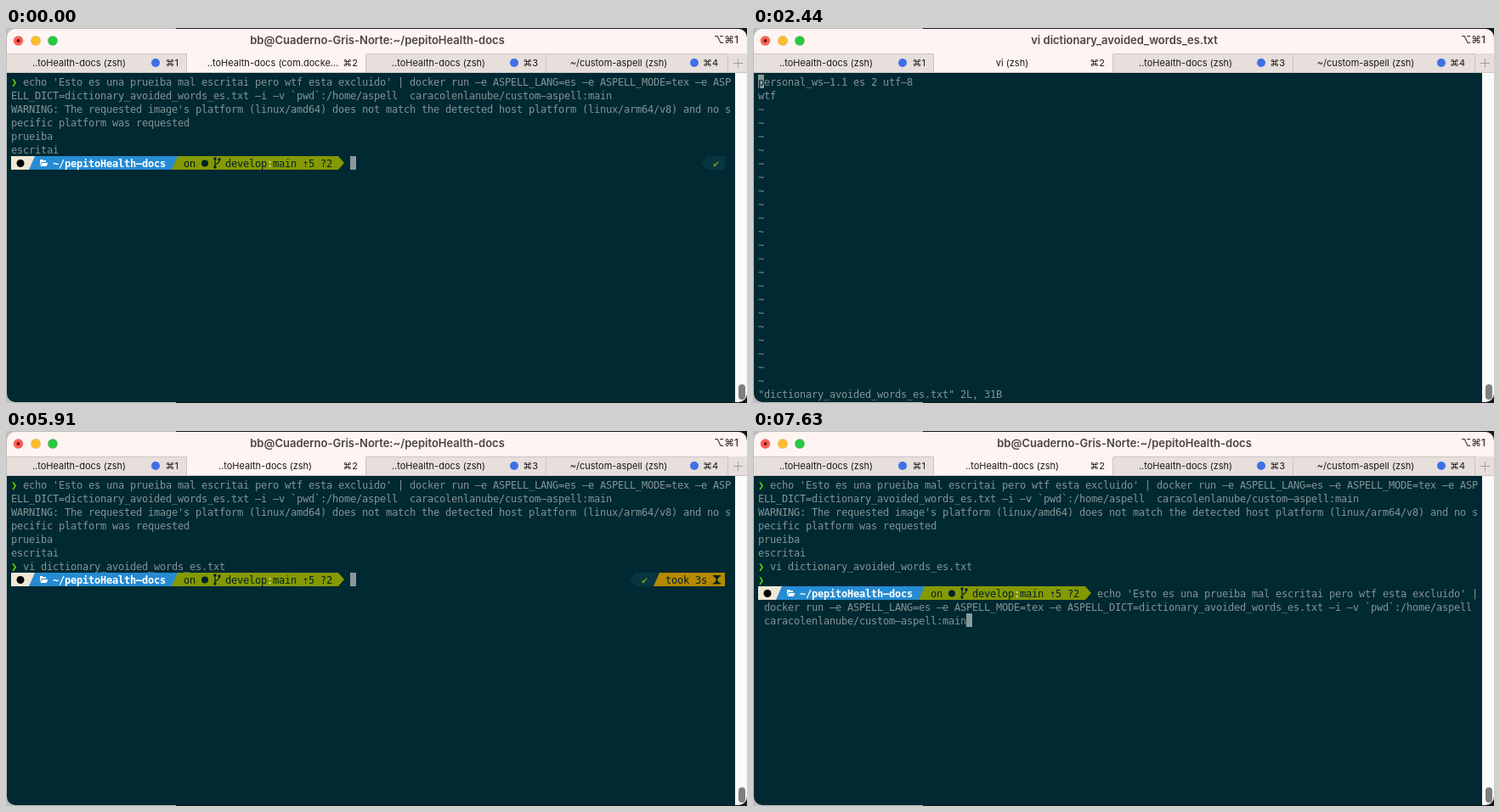
Write an HTML page with a canvas that moves like this. It is 872 px wide and 442 px high and loops after 8000 ms.

```html
<!DOCTYPE html>
<html lang="es">
<head>
<meta charset="utf-8">
<style>
  html, body { margin: 0; width: 100%; height: 100%; overflow: hidden; }
  canvas { display: block; }
</style>
</head>
<body>
<canvas id="stage" width="872" height="442"></canvas>
<script>
const ctx = document.getElementById('stage').getContext('2d');
const LOOP = 8000, COLS = 121, CELL_W = 7, CELL_H = 16, LEFT = 6, TOP = 55;
const MONO = '12px "DejaVu Sans Mono", monospace';
const UI = 'Inter, sans-serif';
const C = {
  bg: '#002932', text: '#839496', cursor: '#8a9a9b', arrow: '#5fd700',
  cream: '#eee8d5', blue: '#268bd2', green: '#859900', amber: '#b58900',
  dim: '#073642', ink: '#00212a', bar: '#fef5f2', tab: '#e6dfdc', line: '#cdc5c2'
};

const FILE = 'dictionary_avoided_words_es.txt';
const VI = 'vi ' + FILE;
const ECHO = "echo 'Esto es una prueiba mal escritai pero wtf esta excluido' | " +
  'docker run -e ASPELL_LANG=es -e ASPELL_MODE=tex -e ASPELL_DICT=' + FILE +
  ' -i -v `pwd`:/home/aspell  caracolenlanube/custom-aspell:main';
const WARNING = "WARNING: The requested image's platform (linux/amd64) does not match " +
  'the detected host platform (linux/arm64/v8) and no specific platform was requested';
const SHELL_TITLE = 'bb@Cuaderno-Gris-Norte:~/pepitoHealth-docs';
const DIR = '..toHealth-docs';

// Each list holds [start time, value]; the latest started value applies.
const TYPED = [[0, ''], [1030, 'v'], [1130, 'vi'], [1410, 'vi '], [1520, 'vi d'],
  [1620, 'vi di'], [1720, 'vi dic'], [2030, VI]];
const RECALLED = [[0, ''], [7560, VI], [7630, ECHO]];
const STATUS = [[0, `"${FILE}" 2L, 31B`], [3660, '-- INSERT --'], [3940, ''],
  [5380, ':'], [5500, ':wq']];
const TAB_TITLE = [[0, DIR + ' (com.docke...'], [30, DIR + ' (zsh)'], [2440, 'vi (zsh)'],
  [3030, 'vi (vi)'], [5720, DIR + ' (vi)'], [5850, DIR + ' (zsh)']];
const at = (list, t) => list.filter(([start]) => start <= t).pop()[1];

const cellX = col => LEFT + col * CELL_W;
const cellY = row => TOP + row * CELL_H;

function rect(x, y, w, h, color) {
  ctx.fillStyle = color;
  ctx.fillRect(x, y, w, h);
}

function poly(color, ...points) {
  ctx.fillStyle = color;
  ctx.beginPath();
  points.forEach(([x, y]) => ctx.lineTo(x, y));
  ctx.fill();
}

function disc(x, y, r, color) {
  ctx.fillStyle = color;
  ctx.beginPath();
  ctx.arc(x, y, r, 0, 7);
  ctx.fill();
}

function label(text, x, y, font, color, align = 'center') {
  ctx.font = `${font} ${UI}`;
  ctx.fillStyle = color;
  ctx.textAlign = align;
  ctx.fillText(text, x, y);
}

// Writes on the character grid, wrapping at the last column; returns the end cell.
function put(text, row, col = 0, color = C.text, weight = '') {
  ctx.font = `${weight} ${MONO}`;
  ctx.fillStyle = color;
  ctx.textAlign = 'left';
  for (const ch of text) {
    if (col === COLS) { col = 0; row++; }
    ctx.fillText(ch === '-' ? '–' : ch, cellX(col++), cellY(row) + 13);
  }
  return [row, col];
}

function cursor(row, col, under = '') {
  rect(cellX(col), cellY(row), CELL_W, CELL_H, C.cursor);
  put(under, row, col, C.bg);
}

function cells(row, from, to, color) {
  rect(cellX(from), cellY(row), (to - from) * CELL_W, CELL_H, color);
}

// Slanted divider filling one cell between two segments.
function slash(row, col, before, after) {
  const x = cellX(col), y = cellY(row);
  cells(row, col, col + 1, after);
  poly(before, [x, y], [x + CELL_W, y], [x, y + CELL_H]);
}

// Triangle filling one cell; dir 1 points right, -1 points left.
function tip(row, col, dir, color) {
  const x = cellX(col) + (dir < 0 ? CELL_W : 0), y = cellY(row);
  poly(color, [x, y], [x + dir * CELL_W, y + 8], [x, y + CELL_H]);
}

function branchIcon(x, y) {
  ctx.strokeStyle = C.ink;
  ctx.lineWidth = 1.2;
  ctx.beginPath();
  ctx.moveTo(x + 2, y + 4);
  ctx.lineTo(x + 2, y + 12);
  ctx.moveTo(x + 7, y + 5);
  ctx.quadraticCurveTo(x + 7, y + 8, x + 2, y + 10);
  ctx.stroke();
  [[2, 3], [7, 4], [2, 13]].forEach(([dx, dy]) => disc(x + dx, y + dy, 1.7, C.ink));
}

function folderIcon(x, y) {
  poly('#fff', [x, y + 4], [x + 3, y + 4], [x + 4, y + 5], [x + 7, y + 5],
    [x + 7, y + 7], [x + 2, y + 7], [x, y + 11]);
  poly('#fff', [x + 2.5, y + 8], [x + 9.5, y + 8], [x + 7.5, y + 12], [x + 0.5, y + 12]);
}

function hourglassIcon(x, y) {
  rect(x, y + 3, 9, 1.5, C.ink);
  rect(x, y + 12, 9, 1.5, C.ink);
  poly(C.ink, [x + 1, y + 4], [x + 8, y + 4], [x + 4.5, y + 9]);
  poly(C.ink, [x + 1, y + 13], [x + 4.5, y + 7.5], [x + 8, y + 13]);
}

function rightPrompt(row, timed) {
  const col = timed ? 105 : 117;
  tip(row, col - 1, -1, C.dim);
  cells(row, col, col + 3, C.dim);
  put('✔', row, col + 1, C.green);
  if (!timed) return;
  slash(row, 108, C.dim, C.amber);
  cells(row, 109, 120, C.amber);
  put('took 3s', row, 110, C.ink);
  hourglassIcon(cellX(118), cellY(row));
}

function prompt(row, input, timed) {
  const y = cellY(row);
  cells(row, 0, 3, C.cream);
  disc(17, y + 8.5, 4.5, '#000');
  slash(row, 3, C.cream, C.blue);
  cells(row, 4, 27, C.blue);
  folderIcon(40, y);
  put('~/pepitoHealth-docs', row, 7, '#fff', 'bold');
  slash(row, 27, C.blue, C.green);
  cells(row, 28, 55, C.green);
  tip(row, 55, 1, C.green);
  put('on', row, 29, C.ink);
  disc(234, y + 8.5, 4, C.ink);
  branchIcon(244, y);
  put('develop', row, 36, C.ink);
  put(':', row, 43, C.cream);
  put('main ⇡5 ?2', row, 44, C.ink);
  if (input !== ECHO) rightPrompt(row, timed);
  cursor(...put(input, row, 57));
}

function pastCommand(text, row) {
  put('❯', row, 0, C.arrow, 'bold');
  put(text, row, 2);
}

function shell(t) {
  pastCommand(ECHO, 0);
  put(WARNING, 2);
  put('prueiba', 4);
  put('escritai', 5);
  if (t < 2440) return prompt(6, at(TYPED, t), false);
  pastCommand(VI, 6);
  if (t < 6780) return prompt(7, '', true);
  pastCommand('', 7);
  prompt(8, at(RECALLED, t), true);
}

function editor(t) {
  const lines = ['personal_ws-1.1 es 2 utf-8', 'wtf'];
  if (t >= 4440) lines.pop();
  for (let row = 0; row < 23; row++) put(lines[row] || '~', row);
  const status = at(STATUS, t);
  put(status, 23, 0, C.text, status.startsWith('--') ? 'bold' : '');
  if (status[0] === ':') cursor(23, status.length);
  else if (t >= 3030 && t < 4440) cursor(1, 0, 'w');
  else cursor(0, 0, 'p');
}

function bell(x, y) {
  ctx.fillStyle = '#5c5654';
  ctx.beginPath();
  ctx.moveTo(x - 6, y + 4);
  ctx.quadraticCurveTo(x - 4, y + 2, x - 4, y - 1);
  ctx.bezierCurveTo(x - 4, y - 8, x + 4, y - 8, x + 4, y - 1);
  ctx.quadraticCurveTo(x + 4, y + 2, x + 6, y + 4);
  ctx.fill();
  disc(x, y + 5, 1.6, '#5c5654');
}

function chrome(t, inEditor) {
  rect(0, 0, 872, 30, C.bar);
  [['#ff5f57', 14.5], ['#febc2e', 35], ['#28c840', 55]].forEach(([color, x]) => {
    disc(x, 15, 6, 'rgba(0,0,0,.18)');
    disc(x, 15, 5.6, color);
  });
  disc(14.5, 15, 2, '#7a0d08');
  label(inEditor ? VI : SHELL_TITLE, 437, 19, '600 13px', '#4b4341');
  label('⌥⌘1', 862, 18, '600 12px', '#4b4341', 'right');

  const ringing = t >= 5030 && t < 5500;
  const activeTitle = at(TAB_TITLE, t);
  const activeCenter = ringing ? 297 : t < 30 ? 314 : 305;
  const tabs = [
    [1, 213, DIR + ' (zsh)', 86], [213, 424, activeTitle, activeCenter],
    [424, 636, DIR + ' (zsh)', 509], [636, 850, '~/custom-aspell (zsh)', 721]
  ];
  rect(0, 30, 872, 23, C.tab);
  tabs.forEach(([left, right, title, center], i) => {
    const active = i === 1;
    if (active) rect(left, 30, right - left, 23, C.bar);
    else rect(left, 30, right - left, 1, C.line);
    rect(right - 1, 31, 1, 21, C.line);
    label(title, center, 45, '11px', '#1c1817');
    label('⌘' + (i + 1), right - 10 - (i === 3 ? 2 : 0), 45, '11px', '#1c1817', 'right');
    if (!active) disc([176, 0, 598, 810][i], 41, 5, '#3f6fe6');
  });
  if (ringing) bell(386, 41);
  rect(0, 52, 872, 1, C.line);
  rect(856, 41, 11, 1, '#a39c9a');
  rect(861, 36, 1, 11, '#a39c9a');
}

function draw(t) {
  const inEditor = t >= 2440 && t < 5720;
  rect(0, 0, 872, 442, '#171717');
  rect(0, 0, 200, 442, '#bdbdbd');
  ctx.save();
  ctx.beginPath();
  ctx.roundRect(1, 1, 871, 440, 10);
  ctx.clip();
  rect(0, 53, 858, 389, C.bg);
  rect(858, 53, 14, 389, '#fbfafa');
  ctx.fillStyle = '#7e7e7e';
  ctx.beginPath();
  ctx.roundRect(862, 420, 8, 18, 4);
  ctx.fill();
  chrome(t, inEditor);
  (inEditor ? editor : shell)(t);
  ctx.restore();
}

function tick(now) {
  draw(now % LOOP);
  requestAnimationFrame(tick);
}
requestAnimationFrame(tick);
</script>
</body>
</html>
```
